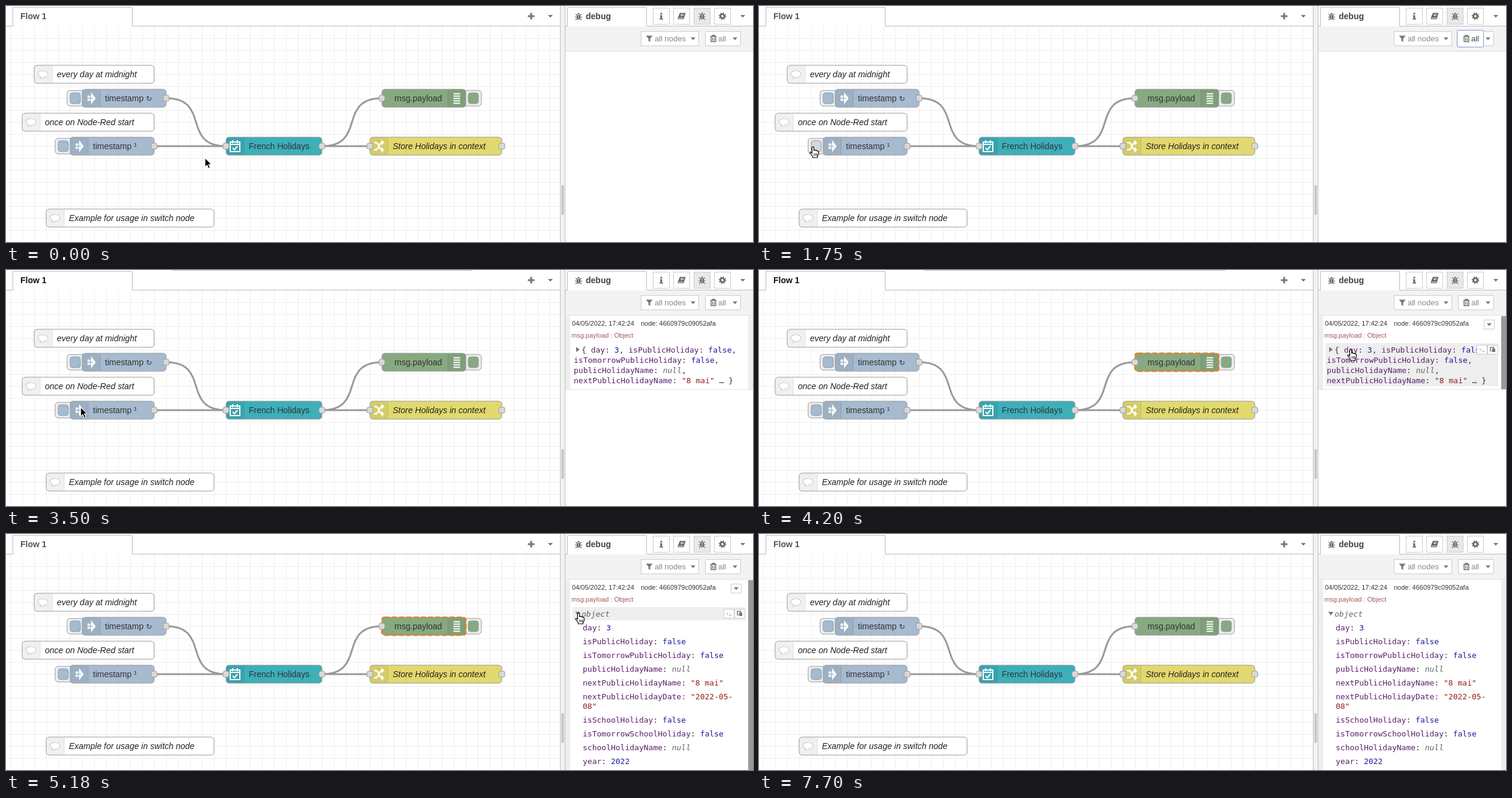
These frames come from a looping animation (1246 px wide and 394 px high, 7.77 s). An HTML page:

```html
<!DOCTYPE html>
<html lang="en">
<head>
<meta charset="utf-8">
<title>Flow editor</title>
<style>
html, body { margin: 0; width: 100%; height: 100%; overflow: hidden; background: #fff; }
svg { display: block; width: 1246px; height: 394px; }
text { font: 14px "Liberation Sans", Arial, sans-serif; fill: #333; white-space: pre; }
.bold { font-weight: bold; fill: #555; }
.italic { font-style: italic; fill: #222; }
.tool { font-size: 13px; fill: #888; }
.small { font-size: 11px; }
.mono { font: 13px "DejaVu Sans Mono", monospace; }
.key { fill: #5a2068; }
.num { fill: #1c1c9a; }
.str { fill: #931f1f; }
.null { fill: #666; font-style: italic; }
</style>
</head>
<body>
<svg id="stage" viewBox="0 0 1246 394"></svg>
<script>
const LOOP = 7770, STEP = 70;

const rect = (x, y, w, h, fill, stroke = 'none', extra = '') =>
  `<rect x="${x}" y="${y}" width="${w}" height="${h}" fill="${fill}" stroke="${stroke}" ${extra}/>`;
const path = (d, fill = 'none', stroke = 'none', width = 1, extra = '') =>
  `<path d="${d}" fill="${fill}" stroke="${stroke}" stroke-width="${width}" ${extra}/>`;
const text = (x, y, content, cls = '', extra = '') =>
  `<text x="${x}" y="${y}" class="${cls}" ${extra}>${content}</text>`;
const group = (id, content) => `<g id="${id}">${content}</g>`;
const at = (x, y, content) => `<g transform="translate(${x} ${y})">${content}</g>`;
const span = (cls, s) => `<tspan class="${cls}">${s}</tspan>`;
const caret = (x, y, color = '#777') => path(`M${x - 4} ${y - 2}h8l-4 4.5z`, color);

// Icons are centred on their own origin.
const icons = {
  inject: path('M-6-4.5H0V-10L7.5 0 0 10V4.5H-6z', '#fff') +
    path('M-6 0H3M-1.5-10V10', 'none', '#a0b4c8', 1.3),
  calendar: path('M-8-7H8V9H-8zM-8-3H8M-4-10v5M4-10v5', 'none', '#fff', 2) +
    path('M-4 3l3 3 5-6', 'none', '#fff', 2),
  change: path('M-8-6h3C0-6 0 6 5 6h2M-8 6h3C0 6 0-6 5-6h2', 'none', '#fff', 2.6) +
    path('M4-11l5 5-5 5zM4 1l5 5-5 5z', '#fff'),
  debug: path('M-5.5-7.5h11M-5.5-3.5h11M-5.5.5h11M-5.5 4.5h11M-5.5 8.5h11', 'none', '#fff', 2),
  comment: path('M-6 7C-4 6-4 5-4 4-12 1-9-6 0-6S12 4 1 5C-1 6-3 7-6 7z', '#fff', '#ccc', 1.2),
  bug: path('M-3-2.5h6V3Q0 8-3 3zM-2.5-3.5Q0-8 2.5-3.5z', '#666') +
    path('M-6 1H6M-5-4l3 2M5-4l-3 2M-5 6l3-3M5 6L2 3', 'none', '#666', 1.2) +
    path('M0-2v7', 'none', '#fff', .8),
  info: path('M-2.5-1.5H1.5V4H3v1.5h-6V4h1.5V0h-1zM-1.5-5.5h3v2.5h-3z', '#666'),
  book: path('M-3-5.5H6.5L3.5 5H-6q-1-1 0-3z', '#666') +
    path('M-1.5-3h5M-2-1h5M-5 3.2H3', 'none', '#fff', 1),
  cog: '<circle r="3.3" fill="none" stroke="#666" stroke-width="2.6"/>' +
    '<circle r="5.3" fill="none" stroke="#666" stroke-width="1.8" stroke-dasharray="2.1 2.06"/>',
  filter: path('M-5.5-5h11L1.5 0V5.5L-1.5 3.5V0z', '#777'),
  trash: path('M-5-3.5H5M-2-4v-1.5h4V-4M-4-3V5H4V-3M-1.5-1.5v5M1.5-1.5v5', 'none', '#666', 1.3),
};

const port = (x, y) => rect(x - 5, y - 5, 10, 10, '#d9d9d9', '#999', 'rx="3"');

// x is the left edge and y the middle of the node.
function node(x, y, w, fill, icon, label, { cls = '', iconX = 0, labelX = 38, ports = [] } = {}) {
  const line = iconX ? iconX : 30;
  return rect(x, y - 15, w, 30, fill, '#999', 'rx="5"') +
    rect(x + iconX + .5, y - 14.5, 29, 29, '#000', 'none', 'opacity=".06" rx="4"') +
    path(`M${x + line} ${y - 14.5}v29`, 'none', '#0002') +
    at(x + iconX + 15, y, icons[icon]) +
    text(x + labelX, y + 4.5, label, cls) +
    ports.map(px => port(px, y)).join('');
}

const comment = (x, y, w, label) => node(x, y, w, '#fff', 'comment', label, { cls: 'italic' });
const nodeButton = (x, y, inner, color, id) =>
  rect(x, y - 13, 32, 26, '#eee', '#999', 'rx="5"') +
  rect(inner, y - 9, 17, 18, color, '#8a9aa9', `rx="4" id="${id}"`);

function workspace() {
  let grid = '';
  for (let x = 7.5; x < 924; x += 20) grid += `M${x} 34V394`;
  for (let y = 54.5; y < 394; y += 20) grid += `M0 ${y}H924`;
  const wires = 'M267 154C342 154 292 234 367 234M247 234H367M527 234C602 234 552 154 627 154M527 234H607';
  const blue = '#a6bbcf', green = '#87a980';
  return path(grid, 'none', '#eee') +
    path('M0 33.5H11.5V2.5H210.5V33.5H924', '#fff', '#bbb') +
    text(24, 22, 'Flow 1', 'bold', 'id="tabLabel"') +
    path('M870.5 17h11M876 11.5v11', 'none', '#777', 3) + caret(908, 17) +
    path(wires, 'none', '#999', 3) +
    comment(47, 114, 200, 'every day at midnight') +
    comment(27, 194, 220, 'once on Node-Red start') +
    comment(67, 354, 280, 'Example for usage in switch node') +
    nodeButton(102, 154, 107, blue, 'dailyButton') +
    node(127, 154, 140, blue, 'inject',
      'timestamp <tspan font-size="12" font-family="DejaVu Sans, sans-serif">↻</tspan>', { ports: [267] }) +
    nodeButton(82, 234, 87, blue, 'startButton') +
    node(107, 234, 140, blue, 'inject', 'timestamp ¹', { ports: [247] }) +
    node(367, 234, 160, '#3dafb9', 'calendar', 'French Holidays', { ports: [367, 527] }) +
    nodeButton(761, 154, 771, green, 'debugButton') +
    node(627, 154, 140, green, 'debug', 'msg.payload', { iconX: 110, labelX: 21 }) +
    rect(627, 139, 140, 30, 'none', '#e8801f', 'rx="5" stroke-width="2.6" stroke-dasharray="8 4" id="nodeGlow"') +
    port(627, 154) +
    node(607, 234, 220, '#e2d96e', 'change', 'Store Holidays in context', { cls: 'italic', ports: [607, 827] }) +
    rect(276, 0, 502, 1.2, '#c4c4c4', 'none', 'id="notice"');
}

function sidebarFrame() {
  const tabs = ['info', 'book', 'bug', 'cog'].map((name, i) =>
    rect(1079.5 + 34 * i, 3.5, 27, 27, name === 'bug' ? '#e8e8e8' : '#fff', '#ccc') +
    at(1093 + 34 * i, 17, icons[name])).join('');
  return rect(924.5, -1, 8, 396, '#f3f3f3', '#bbb') +
    rect(926.5, 299, 4, 50, '#c4c4c4', 'none', 'rx="2"') +
    rect(933, 34, 313, 41, '#f3f3f3') + path('M933 75.5h313', 'none', '#ddd') +
    path('M933 33.5h3.5V2.5H1068.5V33.5H1246', '#fff', '#bbb') +
    at(955, 17.5, icons.bug) + text(967, 22, 'debug', 'bold', 'style="fill:#444"') + tabs + caret(1229, 17) +
    rect(1059.5, 42.5, 96, 24, '#fff', '#ccc') + at(1073, 54.5, icons.filter) +
    text(1082, 59, 'all nodes', 'tool') + caret(1146, 54.5) +
    rect(1166.5, 42.5, 59, 24, '#fff', '#ccc') +
    group('focus', rect(1164.5, 40.5, 44, 28, '#fff', '#7d9cc9', 'rx="1"')) +
    at(1180, 54.5, icons.trash) + text(1188, 59, 'all', 'tool', 'id="allLabel"') + caret(1216, 54.5);
}

// name, value, class of the value
const fields = [
  ['day', '3', 'num'],
  ['isPublicHoliday', 'false', 'num'],
  ['isTomorrowPublicHoliday', 'false', 'num'],
  ['publicHolidayName', 'null', 'null'],
  ['nextPublicHolidayName', '"8 mai"', 'str'],
  ['nextPublicHolidayDate', '"2022-05-', 'str', '08"'],
  ['isSchoolHoliday', 'false', 'num'],
  ['isTomorrowSchoolHoliday', 'false', 'num'],
  ['schoolHolidayName', 'null', 'null'],
  ['year', '2022', 'num'],
];
const pair = ([name, value, cls]) => span('key', name) + ': ' + span(cls, value);
const mono = (x, middle, content) => text(x, middle + 4.5, content, 'mono');

const rows = [{ top: 122, height: 22 }];
function expandedObject() {
  let top = 144.5;
  return path('M949.5 130h8.5l-4.2 6z', '#777') + mono(960, 133, span('null', 'object')) +
    fields.map(field => {
      const height = field[3] ? 39 : 23, middle = top + 11.5;
      rows.push({ top, height });
      top += height;
      return mono(962, middle, pair(field)) +
        (field[3] ? mono(962, middle + 16.5, span('str', field[3])) : '');
    }).join('');
}

function collapsedObject() {
  const [day, today, tomorrow, name, next] = fields.map(pair);
  return path('M951 128.5v8.5l6-4.2z', '#777') +
    mono(960, 133, `{ ${day}, ${today},`) + mono(947, 150, `${tomorrow},`) +
    mono(947, 167, `${name},`) + mono(947, 184, `${next} … }`) +
    path('M933 199.5h313', 'none', '#e4e4e4');
}

const rowTool = (x, icon) => rect(x + .5, -7.5, 17, 15, '#fff', '#ccc') + at(x + 9, 0, icon);
const clipboard = path('M-4-4h5v2M-4-4v6h2', 'none', '#777', 1.6) + rect(-1, -2, 5, 6, '#777');
const prompt = path('M-4-2l2 2-2 2M0 2.5h4', 'none', '#999');
const pin = path('M-2-4h4v3l1.5 2h-7L-2-1zM0 1v4', '#777', '#777', .8);

function message() {
  return group('message',
    group('leftEdge', rect(933, 77, 8, 317, '#eee')) +
    group('rightEdge', rect(1238, 77, 8, 317, '#eee')) +
    text(944, 93, '04/05/2022, 17:42:24', 'small') +
    text(1059, 93, 'node: 4660979c09052afa', 'small') +
    text(943, 113, 'msg.payload : Object', 'small', 'style="fill:#a05a5a"') +
    rect(0, 0, 0, 0, '#eee', 'none', 'id="rowGlow"') +
    group('collapsed', collapsedObject()) + group('expanded', expandedObject()) +
    group('menu', rect(1209.5, 83.5, 17, 15, '#fff', '#ccc') + caret(1218, 91)) +
    group('headTools', rowTool(1197, prompt) + rowTool(1215, clipboard)) +
    group('rowTools', rowTool(1176, prompt) + rowTool(1194, clipboard) + rowTool(1215, pin)));
}

const pointers =
  group('arrow', path('M0 0V14.5L3.4 11.3 5.8 17 8.3 16 5.9 10.4H10.5z', '#000', '#fff', 1)) +
  group('hand', path('M-1.6 1.2Q0-.8 1.6 1.2V6Q3.4 4.8 4.6 6.4 6.4 5.6 7.2 7.2 9.4 6.8 9.4 9V12L7.5 15.5V18H-.5V16L-4.8 10.5Q-5.4 8.2-3 9L-1.6 10.5z',
    '#fff', '#000', 1.2) + path('M2 11v4M4.2 11v4M6.4 11v4', 'none', '#000', .9));

document.getElementById('stage').innerHTML = workspace() + sidebarFrame() + message() + pointers;

// time, x, y of the pointer tip
const track = [
  [0, 332, 254], [210, 332, 254], [910, 83, 239], [1050, 93, 235], [1680, 93, 235],
  [1750, 90, 235], [1890, 90, 235], [2100, 94, 233], [3430, 94, 233], [4060, 987, 133],
  [4200, 987, 133], [4830, 955, 132], [5320, 955, 132], [5600, 1006, 208],
  [6650, 1006, 208], [7000, 1012, 400], [LOOP, 1012, 400],
];
function pointerAt(t) {
  const i = track.findIndex(k => k[0] > t);
  const [t0, x0, y0] = track[i - 1], [t1, x1, y1] = track[i];
  const u = (t - t0) / (t1 - t0), e = u * u * (3 - 2 * u);
  return [x0 + (x1 - x0) * e, y0 + (y1 - y0) * e];
}

const el = id => document.getElementById(id);
const show = (id, on) => el(id).style.display = on ? '' : 'none';
const move = (id, x, y) => el(id).setAttribute('transform', `translate(${x} ${y})`);
const set = (id, attrs) => { for (const a in attrs) el(id).setAttribute(a, attrs[a]); };
const during = (t, from, to) => t >= from && t < to;

function draw() {
  const now = performance.now() % LOOP, t = now - now % STEP;
  const [x, y] = pointerAt(t);
  const received = t >= 2940, expanded = t >= 4900;
  const onMessage = received && x > 933 && t < 7140;
  const onButton = x > 80 && x < 107 && y > 219 && y < 249;

  let row = null;
  if (onMessage && x > 945) {
    const list = expanded ? rows : [{ top: 122, height: 72 }];
    row = list.find(r => y >= r.top && y < r.top + r.height);
  }
  const onHead = !!row && row.top === 122;

  show('focus', during(t, 1190, 2380));
  el('allLabel').style.fill = during(t, 1190, 2380) ? '#444' : '';
  el('tabLabel').style.fill = during(t, 2380, 4900) ? '#111' : '';
  set('startButton', { fill: onButton ? '#d0d8e0' : '#a6bbcf' });
  show('notice', during(t, 3010, 4830));
  show('nodeGlow', onMessage);

  show('message', received);
  show('collapsed', !expanded);
  show('expanded', expanded);
  show('menu', onMessage);
  const edge = { height: expanded ? 317 : 122 };
  set('leftEdge', {});
  for (const id of ['leftEdge', 'rightEdge']) el(id).firstChild.setAttribute('height', edge.height);
  el('rightEdge').firstChild.setAttribute('fill', onMessage ? '#999' : '#eee');

  show('rowGlow', row);
  show('headTools', onHead);
  show('rowTools', row && !onHead);
  if (row) {
    const left = onHead ? 945 : 962;
    set('rowGlow', { x: left, y: row.top, width: 1233 - left, height: row.height });
    move(onHead ? 'headTools' : 'rowTools', 0, row.top + 11);
  }

  const pointing = onButton || onHead;
  show('arrow', !pointing);
  show('hand', pointing);
  move(pointing ? 'hand' : 'arrow', x, y);
  requestAnimationFrame(draw);
}
draw();
</script>
</body>
</html>
```
